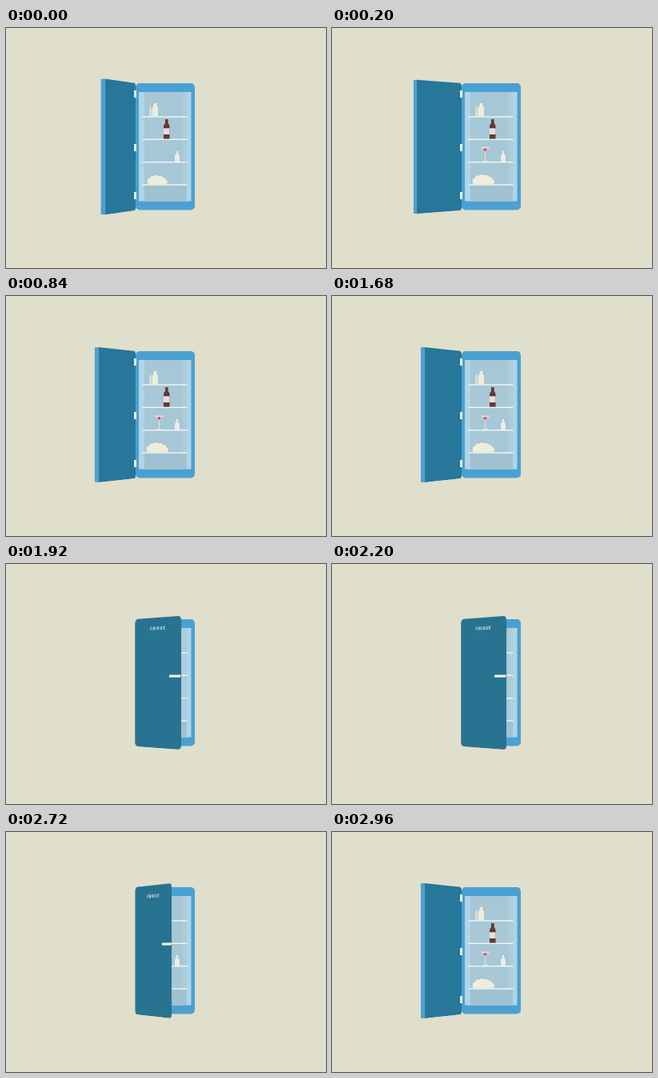
Write an HTML page that moves like this. It is 400 px wide and 300 px high and loops after 3.04 s.

```html
<!DOCTYPE html>
<html lang="en">
<head>
<meta charset="utf-8">
<title>Fridge</title>
<style>
  html, body { margin: 0; width: 100%; height: 100%; overflow: hidden; background: #e0dfcb; }
  .stage {
    position: absolute; left: 0; top: 0; width: 400px; height: 300px; overflow: hidden;
    perspective: 1000px; perspective-origin: 162px 148.5px;
    --loop: 3040ms linear infinite;
  }
  svg { position: absolute; left: 0; top: 0; }

  .door {
    position: absolute; left: 162px; top: 69px; width: 74px; height: 159px;
    transform-origin: 0 50%; transform-style: preserve-3d;
    animation: swing var(--loop);
  }
  .face { position: absolute; inset: 0; backface-visibility: hidden; }
  .front { left: -1px; background: #287391; border-radius: 5px; }
  .inside { background: #26779a; border-radius: 0 4px 4px 0; transform: rotateY(180deg); }
  .edge {
    position: absolute; left: 100%; top: 0; width: 5.5px; height: 100%;
    background: #4aa0d2; transform-origin: 0 50%; transform: rotateY(-90deg);
  }
  .label {
    position: absolute; left: 0; right: 0; top: 9px; padding-left: 1px; text-align: center;
    font: 700 5.8px/8px Roboto, sans-serif; letter-spacing: 1px; color: #e9f1ef;
  }
  .handle { position: absolute; right: 1px; top: 70.2px; width: 18px; height: 2.4px; background: #f1f3ee; }
  .hinge { position: absolute; left: 160px; width: 2.5px; height: 9px; background: #e9efea; }
  .edge, .hinge { animation: when-open var(--loop); }

  .pop { transform-box: fill-box; transform-origin: 50% 100%; }
  .glass { animation: pop-glass var(--loop); }
  .food { animation: pop-food var(--loop); }

  @keyframes swing {
    0% { transform: rotateY(-118.7deg); animation-timing-function: ease-out; }
    7.24% { transform: rotateY(-136.2deg); animation-timing-function: ease-in-out; }
    27.63%, 55.26% { transform: rotateY(-126deg); animation-timing-function: cubic-bezier(.5, 0, .6, .9); }
    63.16% { transform: rotateY(-43deg); animation-timing-function: ease-out; }
    65.79% { transform: rotateY(-38deg); animation-timing-function: ease-in-out; }
    73.03%, 86.84% { transform: rotateY(-44deg); animation-timing-function: ease-in-out; }
    97.37%, 100% { transform: rotateY(-126deg); }
  }
  @keyframes when-open {
    0%, 59.2% { visibility: visible; }
    59.21%, 92.5% { visibility: hidden; }
    92.51%, 100% { visibility: visible; }
  }
  @keyframes pop-glass {
    0%, 1.3% { transform: scale(0); animation-timing-function: ease-out; }
    7.9% { transform: scale(1.12); animation-timing-function: ease-in-out; }
    12%, 100% { transform: scale(1); }
  }
  @keyframes pop-food {
    0% { transform: scale(.92); animation-timing-function: ease-out; }
    2.6% { transform: scale(1.06); animation-timing-function: ease-in-out; }
    7%, 100% { transform: scale(1); }
  }
</style>
</head>
<body>
<div class="stage">
  <svg width="400" height="300" viewBox="0 0 400 300">
    <rect x="162" y="69" width="74" height="158.5" rx="5" fill="#4aa0d2"/>
    <rect x="166" y="80" width="65.5" height="136.5" fill="#b1d4e7"/>
    <rect x="173" y="80" width="53" height="136.5" fill="#adcddb"/>
    <rect x="173" y="80" width="47.5" height="136.5" fill="#a6c7d5"/>
    <rect x="173" y="197" width="53" height="19.5" fill="#9fc1d0"/>

    <path d="M170.5 111H226.5M170.5 139.3H226.5M170.5 167.7H226.5M170.5 196H226.5" stroke="#edf4f3" stroke-width="1.6"/>

    <!-- top shelf -->
    <path d="M179 110.2V101l1-1.5V97h1.5v2.5l1 1.5v9.2z" fill="#d3dfda"/>
    <path d="M183 110.2V100q0-1.6 1.7-2.4V94h3.6v3.6q1.7.8 1.7 2.4v10.2z" fill="#eeeddb"/>

    <!-- beer -->
    <path d="M197 138.5V123q0-2 2-4v-5h3.6v5q1.9 2 1.9 4v15.5z" fill="#68372f"/>
    <rect x="197" y="125.3" width="7.5" height="7.7" fill="#e3e0e1"/>

    <!-- cocktail -->
    <g class="pop glass">
      <path d="M185.5 149.5H197.5L191.5 156.5z" fill="#dde2e2"/>
      <path d="M187.3 151.2H195.7L191.5 156z" fill="#d9a9b3"/>
      <path d="M191.5 156V166.4M188.3 166.4H194.7" stroke="#e5e3e1" stroke-width="1"/>
      <circle cx="191.3" cy="152.7" r="1.5" fill="#bd3d50"/>
    </g>

    <!-- small bottle -->
    <path d="M211 167V160q0-1.6 1.8-2.2V154h2.4v3.8q1.8.6 1.8 2.2v7z" fill="#e8ecea"/>

    <path class="pop food" fill="#f0eddb" d="M177.5 195.2Q174.5 194 176 191.3Q174.8 188 178.5 187.4Q179.5 183.7 183.6 184.6Q187 182 190.4 184Q195 182.8 196.8 186.2Q200.6 186.3 200.8 189.2Q204 190.8 202.6 193.4Q202 195.2 200 195.2z"/>
  </svg>

  <div class="door">
    <div class="face inside"></div>
    <div class="face front">
      <div class="label">FRIDGE</div>
      <div class="handle"></div>
    </div>
    <div class="edge"></div>
  </div>

  <div class="hinge" style="top: 78px"></div>
  <div class="hinge" style="top: 144.5px"></div>
  <div class="hinge" style="top: 204.5px"></div>
</div>
</body>
</html>
```
